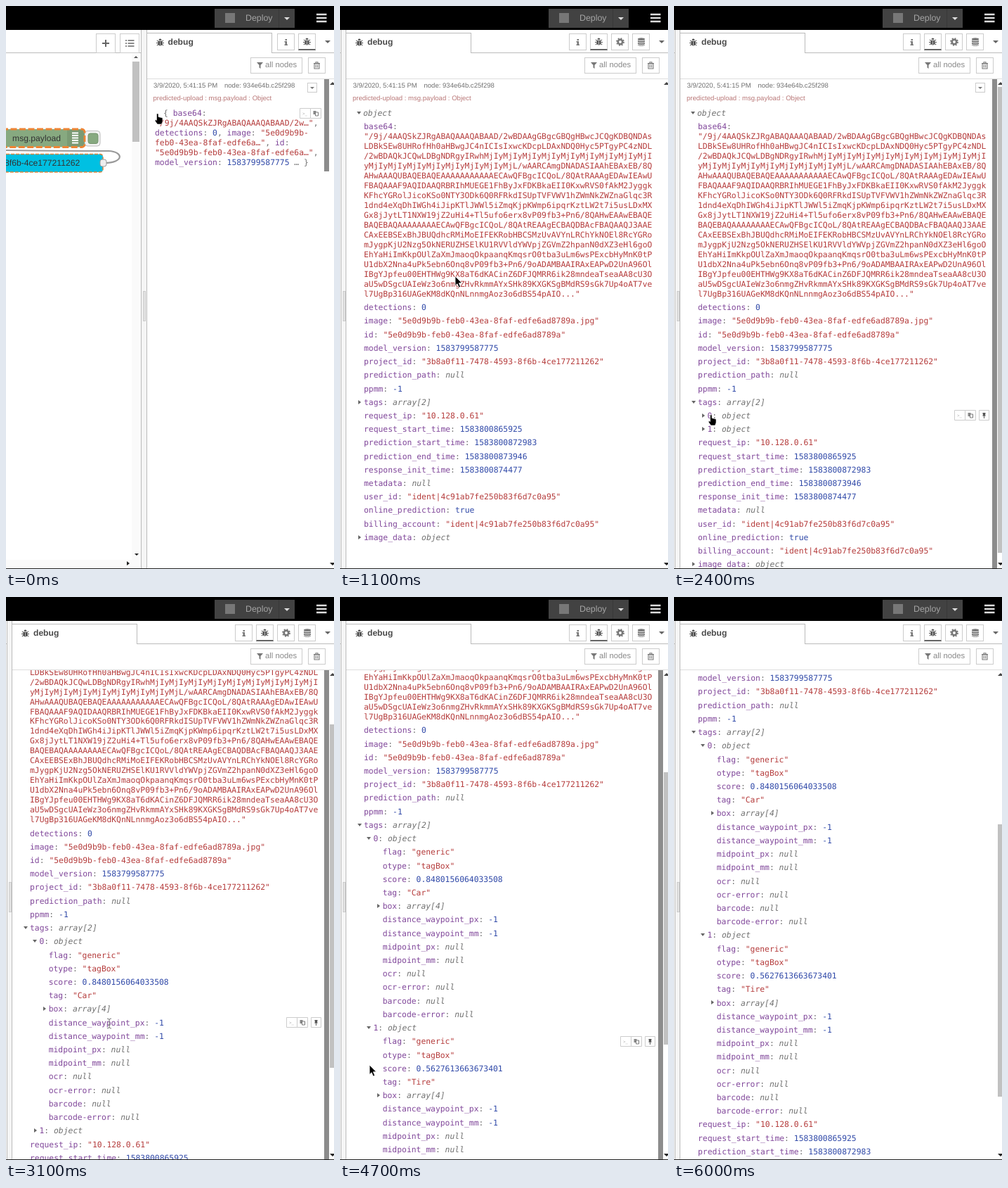
An HTML page for the animation above (6200 ms loop, 467 by 800 pixels).

```html
<!DOCTYPE html>
<html lang="en">
<head>
<meta charset="utf-8">
<title>Debug sidebar</title>
<style>
html, body { margin: 0; width: 100%; height: 100%; overflow: hidden; background: #fff; }
#stage { position: relative; width: 467px; height: 800px; overflow: hidden; background: #fff;
  font-family: "Liberation Sans", Arial, sans-serif; text-rendering: geometricPrecision; }
#stage div, #stage svg { position: absolute; box-sizing: border-box; }
svg { overflow: visible; }
#bar { left: 0; top: 0; width: 467px; height: 34px; background: #000; }
#deploy { left: 297px; top: 4px; width: 114px; height: 27px; background: #424242; }
#deploy i { position: absolute; left: 15px; top: 6px; width: 14px; height: 14px; background: #777; }
#deploy b { position: absolute; left: 44px; top: 5px; font: 12.4px/16px "Liberation Sans", Arial, sans-serif; color: #a4a4a4; }
#deploy u { position: absolute; left: 91px; top: 0; height: 27px; border-left: 1px solid #393939; }
.down, .up { width: 0; height: 0; border: 4px solid transparent; }
.down { border-top-color: currentColor; border-bottom: 0; }
.up { border-bottom-color: currentColor; border-top: 0; }

#work { left: 0; top: 34px; height: 766px; overflow: hidden; border-right: 1px solid #bbb; }
#work .btn { top: 5px; }
.btn { border: 1px solid #ccc; background: #fff; color: #777; }
#split { top: 34px; width: 7px; height: 766px; background: #f5f5f5; }
#split div { left: 2px; top: 371px; width: 4px; height: 43px; background: #e4e4e4; border: 1px solid #ccc; }

#panel { top: 34px; right: 0; height: 766px; background: #fff; border-left: 1px solid #bbb; overflow: hidden; }
#tab { left: 0; top: 4px; width: 178px; height: 29px; border: 1px solid #bbb; border-width: 1px 1px 0 0; background: #fff; z-index: 1; }
#tab b { position: absolute; left: 30px; top: 5px; font-size: 12.1px; line-height: 15px; color: #4a4a4a; }
#tabline { left: 0; right: 0; top: 32px; border-top: 1px solid #bbb; }
#panel .nav { top: 5px; width: 25px; height: 24px; }
#panel .active { border-bottom: 2px solid #666; }
#tools { left: 0; right: 0; top: 33px; height: 37px; border-bottom: 1px solid #ddd; }
#tools .btn { top: 6px; height: 23px; }
#filter span { position: absolute; left: 20px; top: 3px; font-size: 11.25px; line-height: 15px; white-space: nowrap; color: #888; }

#view { left: 0; right: 0; top: 70px; height: 696px; overflow: hidden; }
#msg { left: 0; right: 7px; border-right: 7px solid transparent; padding-bottom: 6px; }
#msg.hover { border-right-color: #8c8c8c; }
.head { left: 9.5px; font-size: 9.55px; line-height: 12px; white-space: pre; color: #707070; }
#menu { right: 10px; top: 5px; width: 14px; height: 14px; }
#short, #tree { font: 11.36px/13.98px "DejaVu Sans Mono", monospace; color: #707070; }
#stage #short { position: relative; margin-left: 11.5px; padding-top: 41px; white-space: pre; }
#stage #tree { position: relative; padding-top: 38.4px; }
#stage .row { position: relative; padding: 2.63px 5px 2.62px 0; word-break: break-all; line-break: anywhere; }
#stage .row[hidden] { display: none; }
.key { color: #80479a; }
.str { color: #b53c3c; }
.num { color: #3049a8; }
.meta { font-style: italic; color: #707070; }
.long { display: block; }
.wide .long { white-space: pre; }
.fold::before { content: ""; position: absolute; margin-left: -8px; top: 6.5px; border: 3px solid transparent;
  border-left: 4px solid #666; border-right: 0; }
.fold.open::before { margin-left: -9.5px; top: 7.6px; border: 3.4px solid transparent; border-top: 4.2px solid #666; border-bottom: 0; }
#thumb { right: 0; width: 6px; background: #c1c1c1; }
#cursor { left: 0; top: 0; z-index: 5; }
</style>
</head>
<body>
<div id="stage">
  <svg width="0" height="0">
    <symbol id="bug" viewBox="0 0 12 12" overflow="visible">
      <path d="M1 3l2 2M11 3l-2 2M0 7h12M1 11l2.5-2.5M11 11L8.500 8.500" stroke="currentColor" stroke-width="1.100"/>
      <path d="M3.800 3a2.200 2.400 0 0 1 4.400 0zM3 4h6v4a3 3.500 0 0 1-6 0z" fill="currentColor"/>
      <path d="M6 5v6" stroke="#fff" stroke-width=".7"/>
    </symbol>
    <symbol id="gear" viewBox="0 0 12 12">
      <circle cx="6" cy="6" r="3.200" fill="none" stroke="currentColor" stroke-width="2.600"/>
      <circle cx="6" cy="6" r="5" fill="none" stroke="currentColor" stroke-width="1.800" stroke-dasharray="1.960"/>
    </symbol>
    <symbol id="db" viewBox="0 0 12 12">
      <path d="M1 2a5 1.800 0 0 1 10 0v8a5 1.800 0 0 1-10 0z" fill="currentColor"/>
      <path d="M1 3a5 1.500 0 0 0 10 0M1 6a5 1.500 0 0 0 10 0M1 9a5 1.500 0 0 0 10 0" fill="none" stroke="#fff" stroke-width=".9"/>
    </symbol>
  </svg>

  <div id="work">
    <svg width="200" height="766">
      <g transform="translate(0 -34)">
        <path d="M0 205Q75 206 146 206C168 207 168 223 140 223" fill="none" stroke="#999" stroke-width="2.200"/>
        <rect x="112" y="177.500" width="22" height="21.500" rx="4" fill="#f3f3f3" stroke="#bbb"/>
        <rect x="117" y="181" width="14" height="14.500" rx="3" fill="#87a980" stroke="#75946e"/>
        <rect x="-60" y="175" width="172" height="25.500" rx="4" fill="#87a980"/>
        <path d="M87 176h24v24H87z" fill="#7b9a74"/>
        <path d="M94 180.500h9M94 184h9M94 187.500h9M94 191h9M94 194.500h9" stroke="#fff" stroke-width="2"/>
        <rect x="-60" y="175" width="172" height="25.500" rx="4" fill="none" stroke="#ee8434" stroke-width="2.800" stroke-dasharray="9 3.500"/>
        <rect x="-60" y="210.500" width="198" height="25.500" rx="4" fill="#00c0e2" stroke="#d9863f" stroke-width="1.500" stroke-dasharray="5 2"/>
        <rect x="134" y="218" width="9" height="10" rx="3" fill="#eee" stroke="#999"/>
        <g font-size="12.170" fill="#333"><text x="9" y="192">msg.payload</text><text x="-2" y="227">8f6b-4ce177211262</text></g>
      </g>
    </svg>
    <div style="right:0;top:0;width:200px;height:33px;border-bottom:1px solid #bbb"></div>
    <div class="btn" style="right:36px;width:28px;height:28px"><svg width="26" height="26"><path d="M13 8v10M8 13h10" stroke="#666" stroke-width="2"/></svg></div>
    <div class="btn" style="right:2px;width:28px;height:28px"><svg width="26" height="26"><path d="M7 9h2M7 13h2M7 17h2M10.500 9h9M10.500 13h9M10.500 17h9" stroke="#666" stroke-width="1.600"/></svg></div>
    <div style="right:0;top:34px;width:13px;height:720px;background:#fafafa"></div>
    <div class="up" style="right:4px;top:37px;border-width:3.500px;border-top:0;color:#555"></div>
    <div style="right:2px;top:45px;width:10px;height:114px;background:#c1c1c1"></div>
    <div class="down" style="right:3px;top:744px;color:#222;border-width:3.500px;border-bottom:0"></div>
    <div style="right:0;top:753px;width:200px;height:13px;background:#fafafa"></div>
    <div style="right:16px;top:755px;border:3.500px solid transparent;border-left:4px solid #222;border-right:0"></div>
  </div>
  <div id="split"><div></div></div>

  <div id="panel">
    <div id="tabline"></div>
    <div id="tab"><svg style="left:13px;top:7px;color:#4a4a4a" width="11" height="11"><use href="#bug"/></svg><b>debug</b></div>
    <div id="nav" style="right:0;top:0;width:145px;height:32px">
      <div class="btn nav"><svg width="23" height="22"><path d="M10.500 7h2.500v2h-2.500zM9.500 10H13v4.500h1V16H9.500v-1.500h1v-3h-1z" fill="#777"/></svg></div>
      <div class="btn nav active"><svg style="left:6px;top:5px;color:#555" width="11" height="11"><use href="#bug"/></svg></div>
      <div class="btn nav"><svg style="left:6px;top:5px" width="12" height="12"><use href="#gear"/></svg></div>
      <div class="btn nav"><svg style="left:6px;top:5px" width="12" height="12"><use href="#db"/></svg></div>
      <div class="down" style="right:5px;top:15px;color:#666"></div>
    </div>
    <div id="tools">
      <div class="btn" id="filter" style="right:45px;width:74px"><svg width="20" height="20"><path d="M8 6h9l-3.500 4v5l-2-1.500V10z" fill="#777"/></svg><span>all nodes</span></div>
      <div class="btn" style="right:12px;width:25px"><svg width="23" height="21"><path d="M7 7.500h9M10 7V5.800h3V7M8 8h7v7H8zM10.300 9.500v4M12.700 9.500v4" stroke="#777" stroke-width="1.100" fill="none"/></svg></div>
    </div>
    <div id="view">
      <div id="msg">
        <div class="head" style="top:4px">3/9/2020, 5:41:15 PM</div>
        <div class="head" style="top:4px;left:110.500px">node: 934e64b.c25f298</div>
        <div class="head" style="top:21.500px;left:9px;color:#b97878">predicted-upload : msg.payload : Object</div>
        <div id="menu" class="btn"><div class="down" style="left:3px;top:5px;border-width:3px;border-bottom:0"></div></div>
        <div id="short"></div>
        <div id="tree"></div>
      </div>
      <svg id="rowtools" width="50" height="15">
        <g fill="#fff" stroke="#ccc"><path d="M.5.5h15v14H.5zM15.500.5h15v14h-15z"/><path class="pin" d="M35.500.5h14v14h-14z"/></g>
        <text x="4" y="10" font-size="6" fill="#aaa">&gt;_</text>
        <path d="M19.500 4h4v5h-4z" fill="#888"/><path d="M22.500 6h4v5h-4z" fill="#fff" stroke="#777"/>
        <path class="pin" d="M40.500 4h4v1l-.5 2 1 1.500h-2V12h-1V8.500h-2L41 7l-.5-2z" fill="#555"/>
      </svg>
      <div id="thumb"></div>
      <div class="up" style="right:-2px;top:4px;color:#444"></div>
      <div class="down" style="right:-2px;top:687px;color:#222"></div>
    </div>
  </div>

  <div id="bar">
    <div id="deploy"><i></i><b>Deploy</b><u></u><div class="down" style="left:99px;top:12px;color:#ddd"></div></div>
    <svg width="467" height="34"><path d="M442 12h14.500M442 17h14.500M442 22h14.500" stroke="#ddd" stroke-width="2.300"/></svg>
  </div>
  <div style="left:0;top:799px;width:467px;height:1px;background:#222"></div>
  <svg id="cursor" width="20" height="20" stroke-linejoin="round">
    <path data-kind="arrow" d="M0 0v13.500l3-2.800 2.200 5.300 2.400-1-2.200-5.200h4.200z" fill="#000" stroke="#fff" stroke-width=".8"/>
    <path data-kind="hand" d="M-1.500 0h2.500v4.500l6 1.500V11l-1.500 4h-6L-4 10l1-1.500 1.500 1z" fill="#000" stroke="#fff" stroke-width=".6"/>
    <path data-kind="beam" d="M-3-7q3 0 3 2v10q0 2-3 2M3-7q-3 0-3 2M0 5q0 2 3 2M-1.500 2h3" fill="none" stroke="#777" stroke-width="1"/>
    <path data-kind="size" d="M-1-6v12M1-6v12M-3 0h-5l3-3M-8 0l3 3M3 0h5l-3-3M8 0l-3 3" fill="none" stroke="#000" stroke-width="1.300"/>
  </svg>
</div>

<script>
const $ = id => document.getElementById(id);
const LOOP = 6200, WIDE = 8.5, NARROW = 200, NOTCH = 92.65;
const HOLDS = [2500, 2700, 4300, 6100];

const base64 = [
  '"/9j/4AAQSkZJRgABAQAAAQABAAD/2wBDAAgGBgcGBQgHBwcJCQgKDBQNDAs',
  'LDBkSEw8UHRofHh0aHBwgJC4nICIsIxwcKDcpLDAxNDQ0Hyc5PTgyPC4zNDL',
  '/2wBDAQkJCQwLDBgNDRgyIRwh' + 'MjIy'.repeat(8) + 'MjI',
  'yMjI'.repeat(7) + 'yMjL/wAARCAmgDNADASIAAhEBAxEB/8Q',
  'AHwAAAQUBAQEBAQEAAAAAAAAAAAECAwQFBgcICQoL/8QAtRAAAgEDAwIEAwU',
  'FBAQAAAF9AQIDAAQRBRIhMUEGE1FhByJxFDKBkaEII0KxwRVS0fAkM2Jyggk',
  'KFhcYGRolJicoKSo0NTY3ODk6Q0RFRkdISUpTVFVWV1hZWmNkZWZnaGlqc3R',
  '1dnd4eXqDhIWGh4iJipKTlJWWl5iZmqKjpKWmp6ipqrKztLW2t7i5usLDxMX',
  'Gx8jJytLT1NXW19jZ2uHi4+Tl5ufo6erx8vP09fb3+Pn6/8QAHwEAAwEBAQE',
  'BAQEBAQAAAAAAAAECAwQFBgcICQoL/8QAtREAAgECBAQDBAcFBAQAAQJ3AAE',
  'CAxEEBSExBhJBUQdhcRMiMoEIFEKRobHBCSMzUvAVYnLRChYkNOEl8RcYGRo',
  'mJygpKjU2Nzg5OkNERUZHSElKU1RVVldYWVpjZGVmZ2hpanN0dXZ3eHl6goO',
  'EhYaHiImKkpOUlZaXmJmaoqOkpaanqKmqsrO0tba3uLm6wsPExcbHyMnK0tP',
  'U1dbX2Nna4uPk5ebn6Onq8vP09fb3+Pn6/9oADAMBAAIRAxEAPwD2UnA96Ol',
  'IBgYJpfeu00EHTHWg9KX8aT6dKACinZ6DFJQMRR6ik28mndeaTseaAA8cU3O',
  'aU5wDSgcUAIeWz3o6nmgZHvRkmmAYxSHk89KXGKSgBMdRS9sGk7Up4oAT7ve',
  'l7UgBp316UAGeKM8dKQnNLnnmgAoz3o6dBS54pAIO..."'
].join('\n');

const image = '5e0d9b9b-feb0-43ea-8faf-edfe6ad8789a';
const account = '"ident|4c91ab7fe250b83f6d7c0a95"';

// Each row: key, value, group that reveals it, group that it opens
const tagRows = (score, tag, group) => [
  ['flag', '"generic"'], ['otype', '"tagBox"'], ['score', score], ['tag', `"${tag}"`],
  ['box', 'array[4]', 'closed'], ['distance_waypoint_px', '-1'], ['distance_waypoint_mm', '-1'],
  ...['midpoint_px', 'midpoint_mm', 'ocr', 'ocr-error', 'barcode', 'barcode-error'].map(k => [k, 'null'])
].map(([key, value, opens]) => [key, value, group, opens]);

const rowData = [
  ['', 'object', 'root', 'root'],
  ['base64', base64],
  ['detections', '0'], ['image', `"${image}.jpg"`], ['id', `"${image}"`],
  ['model_version', '1583799587775'], ['project_id', '"3b8a0f11-7478-4593-8f6b-4ce177211262"'],
  ['prediction_path', 'null'], ['ppmm', '-1'],
  ['tags', 'array[2]', 'root', 'tags'],
  ['0', 'object', 'tags', 'first'], ...tagRows('0.8480156064033508', 'Car', 'first'),
  ['1', 'object', 'tags', 'second'], ...tagRows('0.5627613663673401', 'Tire', 'second'),
  ['request_ip', '"10.128.0.61"'], ['request_start_time', '1583800865925'],
  ['prediction_start_time', '1583800872983'], ['prediction_end_time', '1583800873946'],
  ['response_init_time', '1583800874477'], ['metadata', 'null'], ['user_id', account],
  ['online_prediction', 'true'], ['billing_account', account],
  ['image_data', 'object', 'root', 'closed']
];

const indents = { root: 25, tags: 38.5, first: 51.7, second: 51.7 };
const styleOf = v => v[0] === '"' ? 'str' : /^(null|object|array)/.test(v) ? 'meta' : 'num';
const span = (cls, text) => `<span class="${cls}">${text}</span>`;

const rows = rowData.map(([key, value, group = 'root', opens]) => {
  const el = document.createElement('div');
  el.className = opens ? 'row fold' : 'row';
  el.style.paddingLeft = indents[group] - (key ? 0 : 1) + 'px';
  const long = value === base64 ? ' long' : '';
  el.innerHTML = (key && span('key', key) + ': ') + span(styleOf(value) + long, value);
  $('tree').append(el);
  return { el, group, opens };
});

const cut = '"5e0d9b9b-feb0-43ea-8faf-edfe6a…"';
$('short').innerHTML = [
  `<span style="margin-left:12px">{ ${span('key', 'base64')}:</span>`,
  span('str', '"/9j/4AAQSkZJRgABAQAAAQABAAD/2w…"') + ',',
  `${span('key', 'detections')}: ${span('num', 0)}, ${span('key', 'image')}: ${span('str', cut.slice(0, 10))}`,
  `${span('str', cut.slice(10))}, ${span('key', 'id')}:`,
  span('str', cut) + ',',
  `${span('key', 'model_version')}: ${span('num', '1583799587775')} … }`
].join('\n');

// time, x, y, cursor shape until the next stop
const path = [
  [0, 216, 153, 'hand'], [200, 216, 153, 'arrow'], [400, 196, 400, 'size'], [800, 5, 400, 'arrow'],
  [1100, 164, 384, 'arrow'], [1800, 28, 562, 'hand'], [2100, 28, 562, 'hand'], [2300, 53, 581, 'hand'],
  [2700, 53, 581, 'arrow'], [3000, 147, 606, 'beam'], [3500, 147, 606, 'arrow'], [3900, 139, 408, 'arrow'],
  [4000, 137, 421, 'arrow'], [4100, 133, 437, 'arrow'], [4500, 42, 665, 'hand'], [4700, 42, 665, 'arrow'],
  [5000, 107, 585, 'arrow'], [5100, 104, 600, 'arrow'], [5200, 103, 616, 'arrow'],
  [5600, 120, 700, 'arrow'], [5900, 150, 830, 'arrow'], [LOOP, 150, 830, 'arrow']
];

const mix = (a, b, p) => a + (b - a) * p;
const part = (t, from, to) => Math.min(1, Math.max(0, (t - from) / (to - from)));
const easeOut = p => 1 - (1 - p) ** 3;
const smooth = p => p * p * (3 - 2 * p);

function cursorAt(t) {
  const i = Math.max(1, path.findIndex(s => s[0] > t));
  const [a, b] = [path[i - 1], path[i]];
  const p = part(t, a[0], b[0]);
  return { x: mix(a[1], b[1], p), y: mix(a[2], b[2], p), kind: a[3] };
}

function scrollAt(t) {
  const notches = [[2800, 3050], [3300, 3550], [4650, 4850], [4850, 5200]];
  return NOTCH * notches.reduce((sum, [from, to]) => sum + easeOut(part(t, from, to)), 0);
}

function drawRows(t) {
  const open = { root: t >= 200, tags: t >= 1900, first: t >= 2600, second: t >= 4600 };
  $('short').style.display = open.root ? 'none' : '';
  $('tree').style.display = open.root ? '' : 'none';
  for (const { el, group, opens } of rows) {
    el.hidden = !open[group];
    if (opens) el.classList.toggle('open', !!open[opens]);
  }
  return open.root;
}

function drawTools(t, expanded, scroll, hover) {
  const tools = $('rowtools');
  const y = cursorAt(Math.min(t + 100, LOOP - 1)).y - 104 + scroll;
  const row = rows.find(({ el }) => !el.hidden && y >= el.offsetTop && y < el.offsetTop + el.offsetHeight);
  tools.style.display = hover && (row || !expanded) ? '' : 'none';
  tools.style.right = expanded ? '18px' : '-1px';
  tools.style.top = (expanded && row ? row.el.offsetTop + 2 - scroll : 41) + 'px';
  tools.querySelectorAll('.pin').forEach(p => p.style.display = expanded ? '' : 'none');
}

function drawThumb(scroll) {
  const track = 676, view = 690, size = $('msg').offsetHeight;
  const thumb = $('thumb').style;
  thumb.display = size > view + 6 ? '' : 'none';
  thumb.top = 11 + scroll * track / size + 'px';
  thumb.height = view * track / size + 'px';
}

function draw(t) {
  const left = mix(NARROW, WIDE, smooth(part(t, 400, 800)));
  $('work').style.width = Math.max(1, left - 7) + 'px';
  $('split').style.left = left - 7 + 'px';
  $('panel').style.left = left - .5 + 'px';
  $('stage').classList.toggle('wide', left < 20);

  const count = left < 130 ? 4 : 2;
  [...$('nav').querySelectorAll('.nav')].forEach((b, i) => {
    b.style.display = i < count ? '' : 'none';
    b.style.right = 26 + 30 * (count - 1 - i) + 'px';
  });

  const expanded = drawRows(t);
  const scroll = scrollAt(t);
  const hover = t < 400 || (t >= 1200 && t < 5800);
  $('msg').style.top = -scroll + 'px';
  $('msg').classList.toggle('hover', hover);
  $('menu').style.display = hover ? '' : 'none';
  drawTools(t, expanded, scroll, hover);
  drawThumb(scroll);

  const { x, y, kind } = cursorAt(t);
  $('cursor').style.transform = `translate(${x}px, ${y}px)`;
  for (const shape of $('cursor').children) shape.style.display = shape.dataset.kind === kind ? '' : 'none';
}

const start = performance.now();
let shown = -1;
function tick() {
  let t = Math.floor(((performance.now() - start) % LOOP) / 100) * 100;
  if (HOLDS.includes(t)) t -= 100;
  if (t !== shown) draw(shown = t);
  requestAnimationFrame(tick);
}
tick();
</script>
</body>
</html>
```
